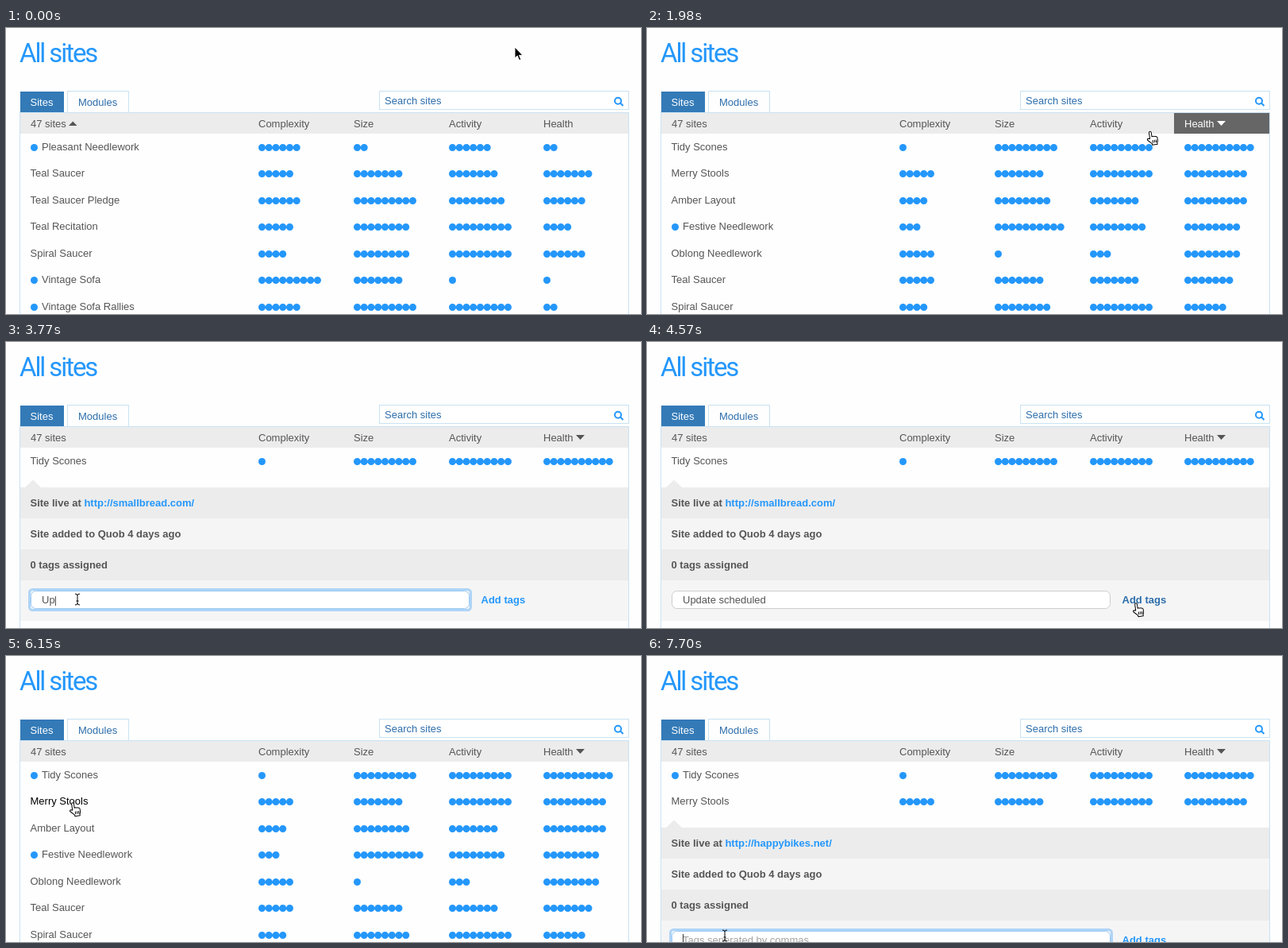
These frames come from a looping animation (800 by 360 pixels, 8000 ms). An HTML page:

```html
<!DOCTYPE html>
<html lang="en">
<head>
<meta charset="utf-8">
<title>All sites</title>
<style>
  html, body { margin: 0; width: 100%; height: 100%; overflow: hidden; background: #fefefe; }
  svg { display: block; font: 13px "Liberation Sans", Arial, sans-serif; }
  .title { font: 33px Roboto, sans-serif; letter-spacing: -2.1px; }
  .bold { font-weight: bold; }
  .dots { stroke: #2497fb; stroke-width: 9; stroke-linecap: round; stroke-dasharray: 0 8.75; }
</style>
</head>
<body>
<svg id="stage" width="800" height="360"></svg>
<script>
const LOOP = 8000, BLUE = '#2497fb', NAVY = '#2c6dab', GREY = '#555', LINE = '#c9e2f3';

// name, complexity, size, activity, health, tagged
const sites = [
  ['Pleasant Needlework', 6, 2, 6, 2, true],
  ['Teal Saucer', 5, 7, 7, 7],
  ['Teal Saucer Pledge', 6, 9, 8, 6],
  ['Teal Recitation', 5, 8, 9, 4],
  ['Spiral Saucer', 4, 8, 9, 6],
  ['Vintage Sofa', 9, 7, 1, 1, true],
  ['Vintage Sofa Rallies', 6, 9, 9, 2, true],
  ['Tidy Scones', 1, 9, 9, 10],
  ['Merry Stools', 5, 7, 9, 9],
  ['Amber Layout', 4, 8, 7, 9],
  ['Festive Needlework', 3, 10, 8, 8, true],
  ['Oblong Needlework', 5, 1, 3, 8],
];
const byName = [0, 1, 2, 3, 4, 5, 6];
const worstFirst = [5, 0, 6, 3, 2, 4, 1];
const bestFirst = [7, 8, 9, 10, 11, 1, 4];
const urls = ['http://smallbread.com/', 'http://happybikes.net/'];

const columns = [['47 sites', 31], ['Complexity', 318], ['Size', 438], ['Activity', 558], ['Health', 677]];
const edges = [18, 305, 425, 545, 664, 784];

// start, end, steps, destination x, y
const moves = [
  [360, 840, 9, 712, 123],
  [1980, 2400, 8, 86, 149],
  [3000, 3470, 8, 90, 324],
  [4270, 4510, 5, 616, 329],
  [4680, 5260, 10, 97, 143],
  [5560, 6150, 8, 84, 185],
  [6570, 6690, 3, 88, 222],
  [6870, 7520, 10, 98, 352],
];

const rowY = i => Math.floor(150 + 33.5 * i);

const text = (x, y, s, fill = GREY, cls = '') =>
  `<text x="${x}" y="${y}" fill="${fill}" class="${cls}">${s}</text>`;
const rect = (x, y, w, h, fill, more = '') =>
  `<rect x="${x}" y="${y}" width="${w}" height="${h}" fill="${fill}" ${more}/>`;
const path = (d, fill, more = '') => `<path d="${d}" fill="${fill}" ${more}/>`;

// Fraction done of a stepped move; the first step shows at once
function stepped(t, start, end, n) {
  const k = Math.floor((t - start) * (n - 1) / (end - start) + 1e-6) + 1;
  return Math.max(0, Math.min(n, k)) / n;
}

function pointerAt(t) {
  let x = 641, y = 24;
  for (const [start, end, n, toX, toY] of moves) {
    const p = stepped(t, start, end, n);
    x += (toX - x) * p;
    y += (toY - y) * p ** 0.6;
  }
  return { x, y };
}

function stateAt(t) {
  const open = t >= 2700 && t < 5560 ? 0 : t >= 6510 ? 1 : -1;
  const tagged = t >= 4680;
  const panelY = open < 0 ? 0 : rowY(open) + 33;
  return {
    open, panelY,
    tagged,
    order: t < 1020 ? byName : t < 1620 ? worstFirst : bestFirst,
    sortColumn: t < 1020 ? 0 : 4,
    descending: t >= 1620,
    hasTag: tagged && open === 0,
    inputY: panelY + (tagged && open === 0 ? 162 : 130),
    focused: (t >= 3470 && t < 4570) || t >= 7700,
    typed: t < 4680 ? 'Update scheduled'.slice(0, 16 * stepped(t, 3770, 4210, 8)) : '',
  };
}

const inHeader = p => p.y > 107 && p.y < 133;
const onName = (p, i, reach) => p.x > 31 && p.x < 130 && Math.abs(p.y - rowY(i)) < reach;
const onAdd = (p, s) => s.open >= 0 && p.x > 598 && p.x < 657 && Math.abs(p.y - s.inputY - 12) < 9;
const onInput = (p, s) => s.open >= 0 && p.x > 31 && p.x < 584 && p.y > s.inputY && p.y < s.inputY + 24;

function frame() {
  return text(17, 43, 'All sites', BLUE, 'title')
    + rect(17.5, 106.5, 767, 300, 'none', `stroke="${LINE}"`)
    + rect(18, 80, 55, 26, '#337ab7') + text(30.5, 98, 'Sites', '#fff')
    + rect(77.5, 79.5, 77, 27, '#fefefe', `stroke="${LINE}"`) + text(91, 98, 'Modules', NAVY)
    + rect(470.5, 79.5, 314, 23, '#fff', `stroke="${LINE}"`) + text(477, 96, 'Search sites', NAVY)
    + path('M774 94.5l3.5 3.5M775 91.7a4 4 0 1 0-8 0a4 4 0 1 0 8 0', 'none', `stroke="${BLUE}" stroke-width="2"`);
}

function header(s, hover) {
  let out = rect(18, 107, 766, 26, '#ececec');
  columns.forEach(([label, x], i) => {
    const dark = inHeader(hover) && hover.x > edges[i] && hover.x < edges[i + 1];
    const ink = dark ? '#fff' : GREY;
    if (dark) out += rect(edges[i], 107, edges[i + 1] - edges[i], 26, '#666');
    out += text(x, 125, label, ink);
    if (i === s.sortColumn) {
      const ax = i ? 718 : 79;
      out += path(s.descending ? `M${ax} 117h11l-5.5 6z` : `M${ax} 123h10.5l-5.25-5.5z`, ink);
    }
  });
  return out;
}

const dots = (x, y, n, stroke = BLUE) =>
  path(`M${x + 4.5} ${y + 0.5}h${(n - 1) * 8.75 + 0.1}`, 'none', `class="dots" style="stroke:${stroke}"`);

function row(s, i, hover) {
  const site = sites[s.order[i]], y = rowY(i);
  const marked = site[5] || (s.tagged && s.order[i] === 7);
  const hot = onName(hover, i, 10);
  let out = marked ? dots(31, y, 1, hot ? '#337ab7' : BLUE) : '';
  out += text(marked ? 45 : 30.5, y + 4, site[0], hot ? '#000' : GREY);
  for (let c = 1; c < 5; c++) out += dots(columns[c][1], y, site[c]);
  return out;
}

function panel(s, hover) {
  const y = s.panelY, extra = s.hasTag ? 32 : 0, top = s.inputY;
  const band = (dy, h, fill) => rect(18, y + dy, 766, h, fill);
  let out = path(`M24 ${y}l10-9.5 10 9.5z`, '#ececec')
    + band(0, 39, '#ececec') + band(39, 39, '#f5f5f5')
    + band(78, 39 + extra, '#ececec') + band(117 + extra, 51, '#f5f5f5')
    + text(30.5, y + 24, `Site live at <tspan fill="${BLUE}">${urls[s.open]}</tspan>`, GREY, 'bold')
    + text(30.5, y + 63, 'Site added to Quob 4 days ago', GREY, 'bold')
    + text(30.5, y + 102, `${s.hasTag ? 1 : 0} tags assigned`, GREY, 'bold');
  if (s.hasTag) {
    out += text(30.5, y + 131, 'Update scheduled')
      + path(`M141 ${y + 124}l6.5 6.5m0-6.5l-6.5 6.5`, 'none', `stroke="${BLUE}" stroke-width="2.8"`);
  }
  if (s.focused) {
    out += rect(29.5, top - 1.5, 556, 26, 'none', 'rx="4" stroke="#aed4f7" stroke-width="3"');
  }
  out += rect(31.5, top + 0.5, 552, 22, '#fff', `rx="6" stroke="${s.focused ? '#9ccaf3' : '#ccc'}"`);
  const caret = s.focused ? '<tspan dx="-1">|</tspan>' : '';
  out += s.typed
    ? text(45, top + 16, s.typed + caret)
    : text(45, top + 16, 'Tags seperated by commas', '#a3a3a3');
  if (s.focused && !s.typed) out += rect(45, top + 4, 1, 15, '#333');
  return out + text(598.5, top + 16, 'Add tags', onAdd(hover, s) ? NAVY : BLUE, 'bold');
}

function pointer(p, s) {
  const hand = inHeader(p) || onAdd(p, s) || s.order.some((_, i) => (s.open < 0 || i <= s.open) && onName(p, i, 6));
  let art;
  if (onInput(p, s)) {
    art = path('M-3-7q3 0 3 2V5q0 2-3 2M3-7q-3 0-3 2M3 7q-3 0-3-2M-1.5 2h3', 'none', 'stroke="#000"');
  } else if (hand) {
    art = path('M-1.5 9V1.2a1.4 1.4 0 0 1 2.8 0V6.5q1.3-.8 2.4.2 1.3-.6 2.3.4 1.9-.3 2 1.8v3q0 1.5-1 3v2.1h-6.5v-1.6'
      + 'L-4.6 10.2q-.6-2.2 1.4-1.9zM1.8 11v3.5M4 11v3.5M6 11v3.5', '#fff',
      'stroke="#000" stroke-linejoin="round" transform="rotate(-8)"');
  } else {
    art = path('M0 0V14l3.2-3 2.4 5.6 2.3-1-2.4-5.2H10z', '#000', 'stroke="#fff"');
  }
  return `<g transform="translate(${p.x.toFixed(1)} ${p.y.toFixed(1)})">${art}</g>`;
}

function scene(t) {
  const s = stateAt(t), p = pointerAt(t);
  const hover = pointerAt(t - 60); // highlights trail the pointer by one step
  let out = frame() + header(s, hover);
  const shown = s.open < 0 ? s.order.length : s.open + 1;
  for (let i = 0; i < shown; i++) out += row(s, i, hover);
  if (s.open >= 0) out += panel(s, hover);
  return out + pointer(p, s);
}

const stage = document.getElementById('stage');
let last = '';
function tick() {
  const markup = scene(performance.now() % LOOP);
  if (markup !== last) stage.innerHTML = last = markup;
  requestAnimationFrame(tick);
}
tick();
</script>
</body>
</html>
```
